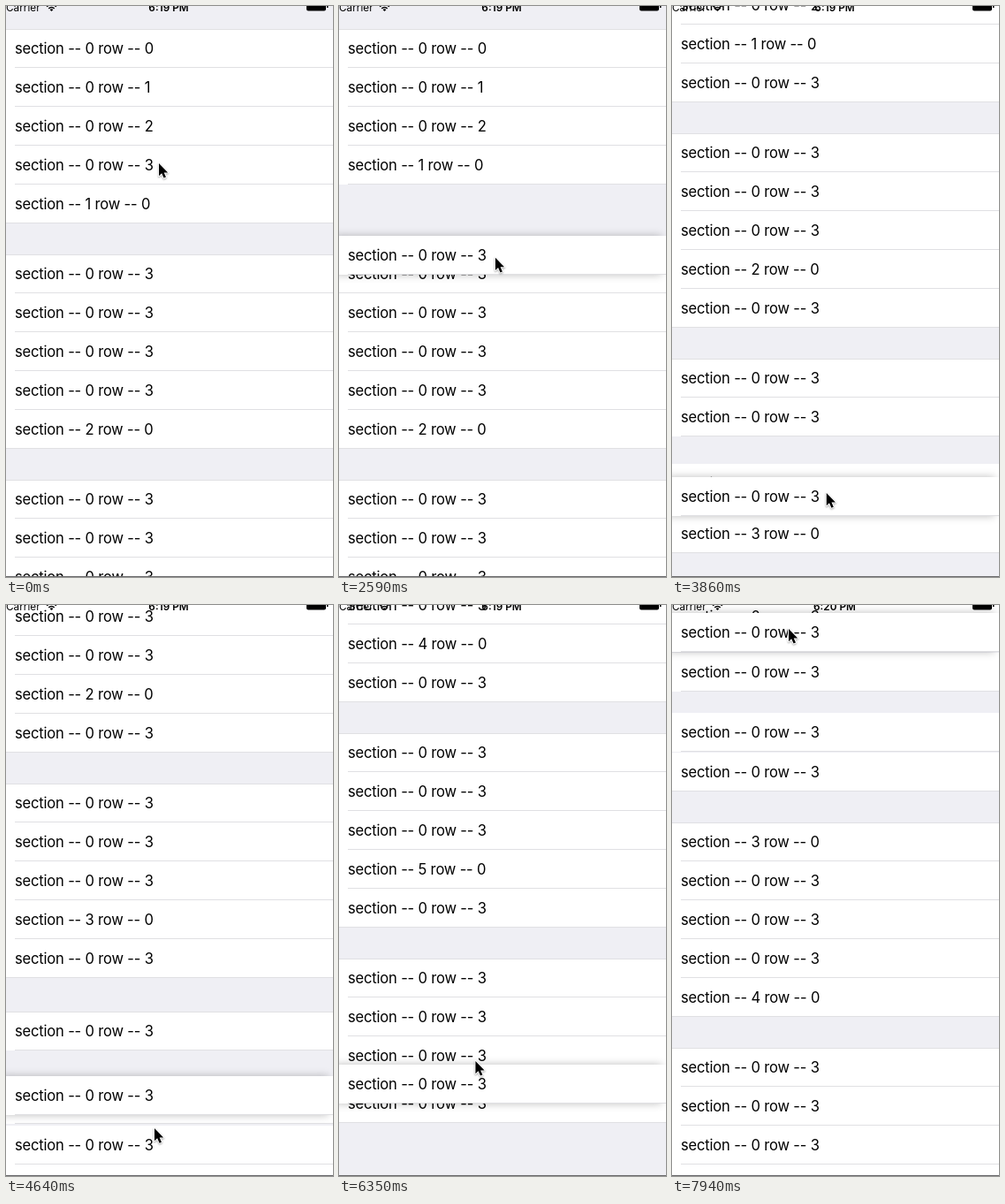
Animation of 370x646 px, one loop 8000 ms. Source, as an HTML page with a canvas:

```html
<!DOCTYPE html>
<html lang="en">
<head>
<meta charset="utf-8">
<title>Reorderable list</title>
<style>
html, body { margin: 0; width: 100%; height: 100%; overflow: hidden; background: #efeff4; }
canvas { display: block; width: 370px; height: 646px; }
</style>
</head>
<body>
<canvas id="stage"></canvas>
<script>
const W = 370, H = 646, LOOP = 8000;
const ROW = 44, SECTION = 255, PER = 5, SECTIONS = 6;
const LIFT = 1790, SWAP = 250;
const BACK = '#efeff4', LINE = '#e0e0e3', INK = '#000';
const FONT = 'Inter, Roboto, sans-serif';
const canvas = document.getElementById('stage');
const ctx = canvas.getContext('2d');
const dpr = window.devicePixelRatio || 1;
canvas.width = W * dpr;
canvas.height = H * dpr;

// Straight moves between a few [time, value] points.
function track(...pts) {
  return t => {
    const i = pts.findIndex(p => p[0] > t);
    if (i === 0) return pts[0][1];
    if (i < 0) return pts[pts.length - 1][1];
    const [t0, v0] = pts[i - 1], [t1, v1] = pts[i];
    return v0 + (v1 - v0) * (t - t0) / (t1 - t0);
  };
}

const dragY = track(
  [1800, 180], [2650, 290], [3000, 400], [3300, 556], [4640, 554], [4690, 596],
  [5580, 623.5], [6170, 622], [6752, 365], [6890, 290], [6970, 186], [7130, 31]
);
const scrollY = track([3320, 0], [4640, 333.5], [5580, 806], [5760, 901], [7080, 901], [7940, 545]);
const pointerX = track([60, 173], [180, 171], [1790, 171], [3150, 181], [4640, 168], [6170, 161], [6970, 132]);
const restY = track([60, 178], [180, 176]);

const slotY = n => 48 + Math.floor(n / PER) * SECTION + (n % PER) * ROW;

// Each section ends with the first row of the next one.
function makeRows() {
  return Array.from({ length: SECTIONS * PER }, (_, n) => {
    const s = Math.floor(n / PER), r = n % PER;
    const borrowed = r === PER - 1 && s < SECTIONS - 1;
    const from = borrowed ? s + 1 : 0;
    const index = borrowed ? 0 : s ? 3 : r;
    return { text: `section -- ${from} row -- ${index}`, stops: [{ t: -SWAP, slot: n }] };
  });
}

// Follow the finger once; every slot it enters trades places with the held row.
function recordSwaps(rows, held) {
  const order = rows.slice();
  const missed = 14; // passed over on the way back up
  for (let t = LIFT; t < LOOP; t += 2) {
    const y = dragY(t) + scrollY(t);
    const next = order.findIndex((_, n) => Math.abs(slotY(n) - y) <= ROW / 2);
    if (next < 0 || next === held || (next === missed && next < held)) continue;
    order[next].stops.push({ t, slot: held });
    [order[next], order[held]] = [order[held], order[next]];
    held = next;
  }
}

const rows = makeRows();
const heldRow = rows[3];
recordSwaps(rows, 3);

function place(row, t) {
  let i = row.stops.length - 1;
  while (i > 0 && row.stops[i].t > t) i--;
  const { t: start, slot } = row.stops[i];
  const from = slotY(row.stops[Math.max(0, i - 1)].slot);
  const u = Math.min(1, (t - start) / SWAP);
  return { y: from + (slotY(slot) - from) * u * u * (3 - 2 * u), rank: slot % PER };
}

function box(x, y, w, h, color) {
  ctx.fillStyle = color;
  ctx.fillRect(x, y, w, h);
}

function write(text, x, y, font, spacing = '0px') {
  ctx.fillStyle = INK;
  ctx.font = `${font} ${FONT}`;
  ctx.letterSpacing = spacing;
  ctx.fillText(text, x, y);
}

function drawCell(text, y, rank) {
  const top = Math.round(y - ROW / 2);
  if (top > H || top < -ROW) return;
  box(0, top, W, ROW, '#fff');
  if (rank === 0) box(0, top, W, 1, LINE);
  const inset = rank === PER - 1 ? 0 : 10;
  box(inset, top + ROW - 1, W - inset, 1, LINE);
  write(text, 10, top + 28, '16.6px', '-0.2px');
}

function drawHeld(t) {
  const y = dragY(t);
  ctx.save();
  ctx.shadowColor = 'rgba(0,0,0,.26)';
  ctx.shadowBlur = 9 * dpr;
  ctx.shadowOffsetX = -5 * dpr;
  box(0, Math.round(y - ROW / 2), W, ROW, '#fff');
  ctx.restore();
  drawCell(heldRow.text, y, 3);
}

function fan(radius, solid) {
  ctx.beginPath();
  if (solid) ctx.moveTo(51.5, 6);
  ctx.arc(51.5, 6, radius, -Math.PI * 0.75, -Math.PI * 0.25);
  solid ? ctx.fill() : ctx.stroke();
}

function drawStatus(t) {
  write('Carrier', 0, 5.5, '11.8px');
  ctx.textAlign = 'center';
  write(t < 6500 ? '6:19 PM' : '6:20 PM', 184, 5.5, '600 11.8px');
  ctx.textAlign = 'left';
  ctx.strokeStyle = INK;
  ctx.lineWidth = 1.6;
  fan(2.6, true);
  fan(4.5);
  fan(7.5);
  ctx.beginPath();
  ctx.roundRect(340, -5, 22, 10.5, 2);
  ctx.fill();
  box(363, -2, 1.5, 4, INK);
}

const arrow = new Path2D('M0 0V14.2L3.2 11.2L5.6 16.6L8 15.6L5.7 10.4H10.2Z');

// The pointer runs a little ahead of the row it drags.
function drawPointer(t) {
  ctx.save();
  ctx.translate(pointerX(t), t < LIFT ? restY(t) : dragY(t + 50) - 4);
  ctx.shadowColor = 'rgba(0,0,0,.35)';
  ctx.shadowBlur = 2 * dpr;
  ctx.shadowOffsetY = dpr;
  ctx.lineWidth = 2;
  ctx.lineJoin = 'round';
  ctx.strokeStyle = '#fff';
  ctx.stroke(arrow);
  ctx.shadowColor = 'transparent';
  ctx.fillStyle = INK;
  ctx.fill(arrow);
  ctx.restore();
}

function draw(t) {
  ctx.setTransform(dpr, 0, 0, dpr, 0, 0);
  box(0, 0, W, H, BACK);
  const lifted = t >= LIFT, offset = scrollY(t);
  for (const row of rows) {
    if (lifted && row === heldRow) continue;
    const { y, rank } = place(row, t);
    drawCell(row.text, y - offset, rank);
  }
  if (lifted) drawHeld(t);
  drawStatus(t);
  box(0, H - 1, W, 1, '#6a6a6c');
  drawPointer(t);
}

const start = performance.now();
function tick(now) {
  draw(Math.max(0, now - start) % LOOP);
  requestAnimationFrame(tick);
}
draw(0);
requestAnimationFrame(tick);
</script>
</body>
</html>
```
